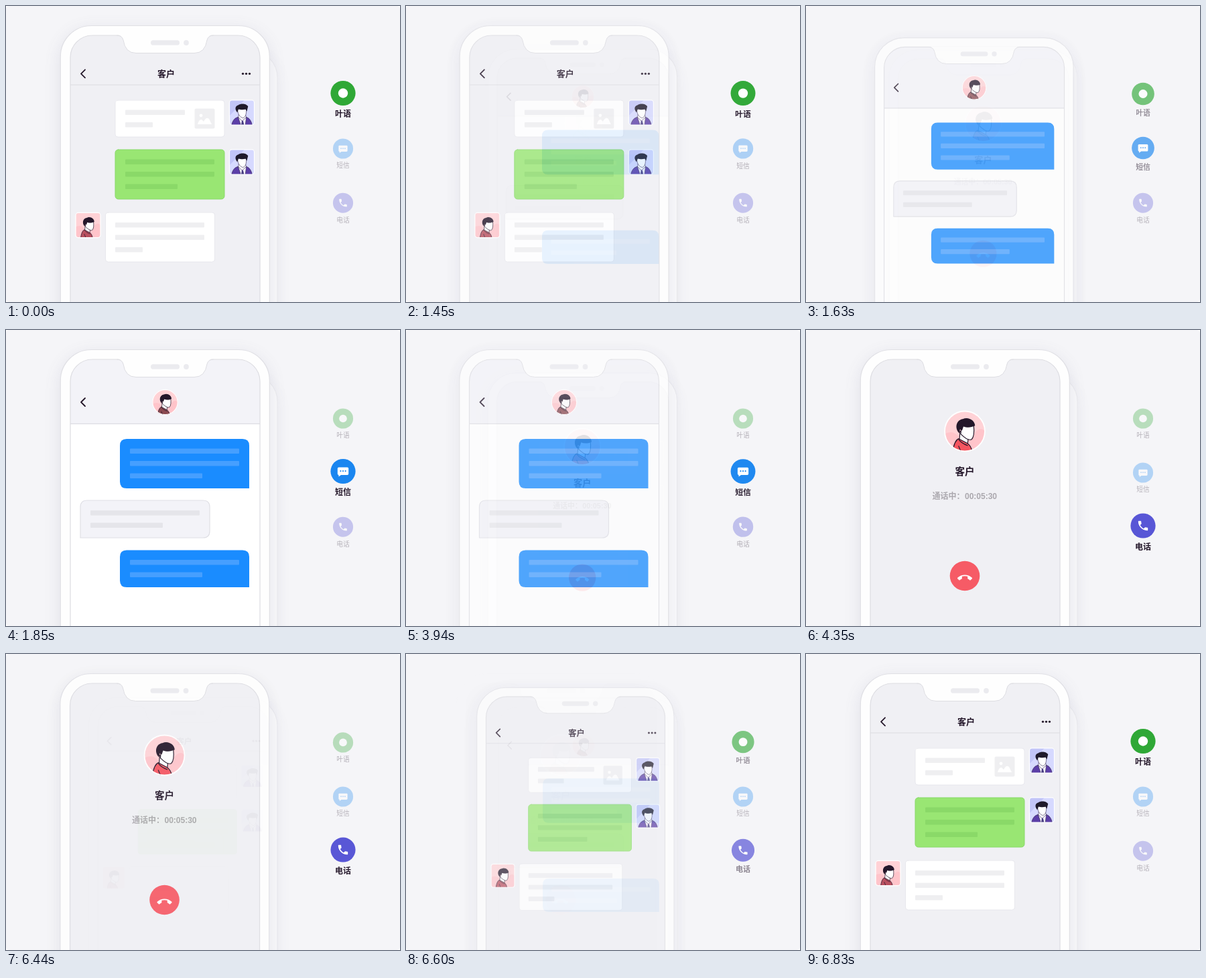
Recreate the animation shown at these times as an HTML page. Size 588 by 443 pixels, loop 7280 ms.

```html
<!DOCTYPE html>
<html lang="zh-CN">
<head>
<meta charset="utf-8">
<title>Contact channels</title>
<style>
  html, body { margin: 0; width: 100%; height: 100%; overflow: hidden; background: #fff; }
  svg { display: block; width: 588px; height: 443px; }
  text { font-family: "Noto Sans CJK SC", "Noto Sans CJK", "Noto Sans", sans-serif; text-anchor: middle; fill: #24172a; }
  .bold { font-weight: 700; }
</style>
</head>
<body>
<svg id="stage" viewBox="0 0 588 443"></svg>
<script>
const LOOP = 7280;
const INK = '#24172a', LINE = '#dddde2', PAPER = '#f0f0f4', BAR = '#efeff1';
const BLUE = '#1a8cff';
const CALL = 'M6.62 10.79c1.44 2.83 3.76 5.14 6.59 6.59l2.2-2.2c.27-.27.67-.36 1.02-.24 1.12.37 2.33.57 3.57.57.55 0 1 .45 1 1V20c0 .55-.45 1-1 1-9.39 0-17-7.61-17-17 0-.55.45-1 1-1h3.5c.55 0 1 .45 1 1 0 1.25.2 2.45.57 3.57.11.35.03.74-.25 1.02l-2.2 2.2z';

const rect = (x, y, w, h, fill, rx = 0, more = '') =>
  `<rect x="${x}" y="${y}" width="${w}" height="${h}" rx="${rx}" fill="${fill}" ${more}/>`;
const circle = (x, y, r, fill, more = '') =>
  `<circle cx="${x}" cy="${y}" r="${r}" fill="${fill}" ${more}/>`;
const path = (d, fill, more = '') => `<path d="${d}" fill="${fill}" ${more}/>`;
const stroke = (color, width = 1) =>
  `stroke="${color}" stroke-width="${width}" stroke-linecap="round" stroke-linejoin="round"`;
const label = (x, y, size, words, more = 'class="bold"') =>
  `<text x="${x}" y="${y + size * 0.37}" font-size="${size}" ${more}>${words}</text>`;
const bars = (x, y, widths, fill) =>
  widths.map((w, i) => rect(x, y + i * 18.5, w, 7.5, fill, 1)).join('');
const chevron = y => path(`M118 ${y - 6}l-6 6 6 6`, 'none', stroke(INK, 1.8));
const divider = y => path(`M96 ${y}H379`, 'none', stroke(LINE, 1.2));

// Busts are drawn around 0,0 for a frame of radius 30.
function customer(jacket) {
  const edge = stroke(INK, 1.2);
  return path('M-32 5Q-16-4-8 10T12 6T32 4V-32H-32z', '#ffd2d6')
    + path('M-7 0L-8 14 4 20 5 10z', '#fff', edge)
    + path('M-18 32Q-16 14-9 11L4 18Q10 22 11 32z', jacket, edge)
    + path('M-9 12Q-5 18 4 21M-9 22L-5 32', 'none', edge)
    + path('M-5-8L13-9C14 0 14 8 10 12C6 14-1 9-6 4z', '#fff', edge)
    + path('M-8 3C-16-5-12-17-3-18C5-22 15-16 15-8C9-5 3-5-2-7L-4-1-7-3z', INK);
}
function agent() {
  const edge = stroke('#352650', 1);
  return path('M-32 10L8-32H32V32H-32z', '#d6d9ff')
    + path('M-7 0L-9 14 2 24 11 13 8 2z', '#fff', edge)
    + path('M-25 32Q-23 15-10 11L1 30 11 11Q23 15 25 32z', '#5c3fa8', edge)
    + path('M-9 11L-2 32 8 32 11 11 1 20z', '#f3efff', edge)
    + path('M0 20L-2 32H6L3 20z', '#463c80')
    + path('M-10-8L10-9C12 2 9 11 3 13C-4 12-9 5-10-4z', '#fff', edge)
    + path('M-11 0C-18-9-16-16-9-18C-1-24 12-21 15-15L12-3 9-8C2-6-4-7-8-9z', '#1f1a2b');
}
const squareAvatar = (x, y, bg, bust) =>
  `<g transform="translate(${x} ${y}) scale(.617)"><g clip-path="url(#square)">${rect(-30, -30, 60, 60, bg)}${bust}</g>`
  + rect(-30, -30, 60, 60, 'none', 6, stroke('#fff', 2)) + '</g>';
const roundAvatar = (x, y, r, jacket) =>
  `<g transform="translate(${x} ${y}) scale(${r / 30})"><g clip-path="url(#round)">${circle(0, 0, 30, '#ffc4ca')}${customer(jacket)}</g>`
  + circle(0, 0, 29.5, 'none', stroke('#fff', 1.8)) + '</g>';

function chatScreen() {
  const card = stroke('#e8e8ed');
  return rect(96, 44, 283, 720, PAPER) + divider(118) + chevron(101.3)
    + label(239, 101.5, 13, '客户')
    + [353.5, 358.5, 363.5].map(x => circle(x, 101.3, 1.6, INK)).join('')
    + rect(163, 141, 163, 55, '#fff', 4, card) + bars(178, 155.5, [89, 41], BAR)
    + rect(281.5, 153.5, 30, 30, BAR, 2) + circle(291, 163.8, 2.4, '#fff')
    + path('M286 177Q288 169 292 170L295 173Q299 165 303 169L307 177z', '#fff')
    + rect(163, 215, 163, 74, '#99e673', 4.5, stroke('#88d96a'))
    + bars(178, 229.5, [133, 133, 78], '#8ad968')
    + rect(148.5, 309, 163, 74, '#fff', 4, card) + bars(163, 324, [133, 133, 41], BAR)
    + squareAvatar(352, 159.5, '#c2c5f8', agent())
    + squareAvatar(352, 233.5, '#c2c5f8', agent())
    + squareAvatar(122.5, 328, '#ffc4ca', customer('#b9505f'));
}
function smsScreen() {
  const sent = (y, h) => path(`M180 ${y}H353q10 0 10 10V${y + h}H180q-10 0-10-10V${y + 10}q0-10 10-10z`, BLUE);
  return rect(96, 44, 283, 720, '#fff') + rect(96, 44, 283, 96, '#f3f3f8') + divider(140.3)
    + chevron(108) + roundAvatar(237.5, 108, 19, '#8b4a51')
    + sent(163, 74) + bars(185, 177.5, [163, 163, 108], '#469fff')
    + path('M111 311V265q0-10 10-10H294q10 0 10 10V301q0 10-10 10z', '#f3f3f8', stroke('#dfdfe5', 1.2))
    + bars(126, 270, [163, 108], '#e5e5ea')
    + sent(329.5, 55.5) + bars(185, 344, [163, 108], '#469fff');
}
function callScreen() {
  const grey = anchor => `class="bold" style="text-anchor:${anchor};fill:#aba8ae`;
  return rect(96, 44, 283, 720, PAPER) + roundAvatar(237, 151.5, 30.5, '#f45560')
    + label(237, 212, 14.5, '客户')
    + label(188.5, 248.8, 12, '通话中：', grey('start') + '"')
    + label(285, 248.8, 12, '00:05:30', grey('end') + ';font-family:Liberation Sans,sans-serif"')
    + circle(237, 368, 22.3, '#f65b66')
    + `<g transform="translate(237 371.5) rotate(135) scale(.9) translate(-12 -12)">${path(CALL, '#fff')}</g>`;
}

const phone = screen => '<g class="phone">'
  + rect(81, 36, 312, 760, '#55557d', 46, 'opacity=".13" filter="url(#soft)"')
  + rect(81.3, 29.5, 312, 760, '#fefefe', 46, stroke('#e0e0e5', 1.2))
  + `<g clip-path="url(#screen)">${screen}</g>`
  + rect(96, 44, 283, 720, 'none', 33, stroke(LINE, 1.2))
  + path('M165 43Q173 43 175 51Q178 70.5 194 70.5H281Q297 70.5 300 51Q302 43 310 43z', '#fefefe')
  + path('M166 44Q173 44 175 51Q178 70.5 194 70.5H281Q297 70.5 300 51Q302 44 309 44', 'none', stroke(LINE))
  + rect(216, 51.2, 43, 7.4, '#ebebef', 3.7) + circle(269, 55, 3.9, '#ebebef') + '</g>';

const smsIcon = path('M-6.5-6H6.5q1.7 0 1.7 1.7V3.8q0 1.7-1.7 1.7H-3L-6.5 8V5.5q-1.7 0-1.7-1.7V-4.3q0-1.7 1.7-1.7z', '#fff')
  + [-3.6, 0, 3.6].map(x => circle(x, -0.4, 1.1, '#1a86f0')).join('');
const callIcon = `<g transform="scale(.8) translate(-12 -12)">${path(CALL, '#fff')}</g>`;
const channels = [
  { name: '叶语', color: '#2fa836', icon: circle(0, 0, 7.2, '#fff'), on: 130.5, off: 132.5 },
  { name: '短信', color: '#1a86f0', icon: smsIcon, on: 211.5, off: 213.5 },
  { name: '电话', color: '#5856d6', icon: callIcon, on: 293, off: 294.7 }
];
const button = c => `<g class="channel">${circle(0, 0, 18.6, c.color)}${c.icon}`
  + label(0, 31.2, 12, c.name, 'class="bold"') + label(0, 31.2, 12, c.name, '') + '</g>';

const stage = document.getElementById('stage');
stage.innerHTML = `<defs>
  <filter id="soft" x="-20%" y="-10%" width="140%" height="120%"><feGaussianBlur stdDeviation="13"/></filter>
  <clipPath id="screen">${rect(96, 44, 283, 720, '#000', 33)}</clipPath>
  <clipPath id="square">${rect(-30, -30, 60, 60, '#000', 6)}</clipPath>
  <clipPath id="round">${circle(0, 0, 30, '#000')}</clipPath></defs>`
  + rect(0, 0, 588, 443, '#f5f5f8', 5)
  + `<g id="stack">${[chatScreen(), smsScreen(), callScreen()].map(phone).join('')}</g>`
  + channels.map(button).join('');

const stack = document.getElementById('stack');
const phones = [...stack.children];
const buttons = [...stage.querySelectorAll('.channel')];
const turns = [
  { start: 1450, end: 1850, hold: 100, first: 0.17 },
  { start: 3940, end: 4350, hold: 100, first: 0.19 },
  { start: 6440, end: 6830, hold: 80, first: 0.12 }
];

const mix = (a, b, k) => a + (b - a) * k;
const ease = p => p < 0.5 ? 0.5 * (2 * p) ** 2.5 : 1 - 0.5 * (2 - 2 * p) ** 2.5;

// Each turn advances in five held steps and then rests.
function poseAt(t) {
  const index = turns.findIndex(turn => t < turn.end);
  if (index < 0) return { front: 0, p: 0 };
  const { start, end, hold, first } = turns[index];
  if (t < start) return { front: index, p: 0 };
  const dt = t - start - hold;
  const step = dt < 0 ? 0 : 1 + Math.floor(4 * dt / (end - start - hold));
  return { front: index, p: mix(first, 1, step / 5) };
}

function place(node, x, y, scale, opacity) {
  node.setAttribute('transform', `translate(${x} ${y}) scale(${scale})`);
  node.setAttribute('opacity', opacity);
}

let shownFront = -1;
function draw(t) {
  const { front, p } = poseAt(t);
  const next = (front + 1) % 3, last = (front + 2) % 3;
  const e = ease(p), gone = ease(Math.min(1, 2 * p));

  if (front !== shownFront) {
    stack.append(phones[last], phones[next], phones[front]);
    shownFront = front;
  }
  place(phones[front], -6 * gone, 0, 1, 1 - gone);
  place(phones[next], 51.1 * (1 - e), 39.5 * (1 - e), mix(0.9, 1, e), mix(0.5, 1, e));
  place(phones[last], 51.1, 39.5, 0.9, 0.5 * e);

  channels.forEach((c, i) => {
    const active = i === front ? 1 - e : i === next ? e : 0;
    place(buttons[i], 503, mix(c.off, c.on, active), mix(0.81, 1, active), mix(0.3, 1, active));
    const [bold, plain] = buttons[i].querySelectorAll('text');
    bold.setAttribute('opacity', active);
    plain.setAttribute('opacity', 1 - active);
  });
}

const began = performance.now();
function tick() {
  draw((performance.now() - began) % LOOP);
  requestAnimationFrame(tick);
}
tick();
</script>
</body>
</html>
```
